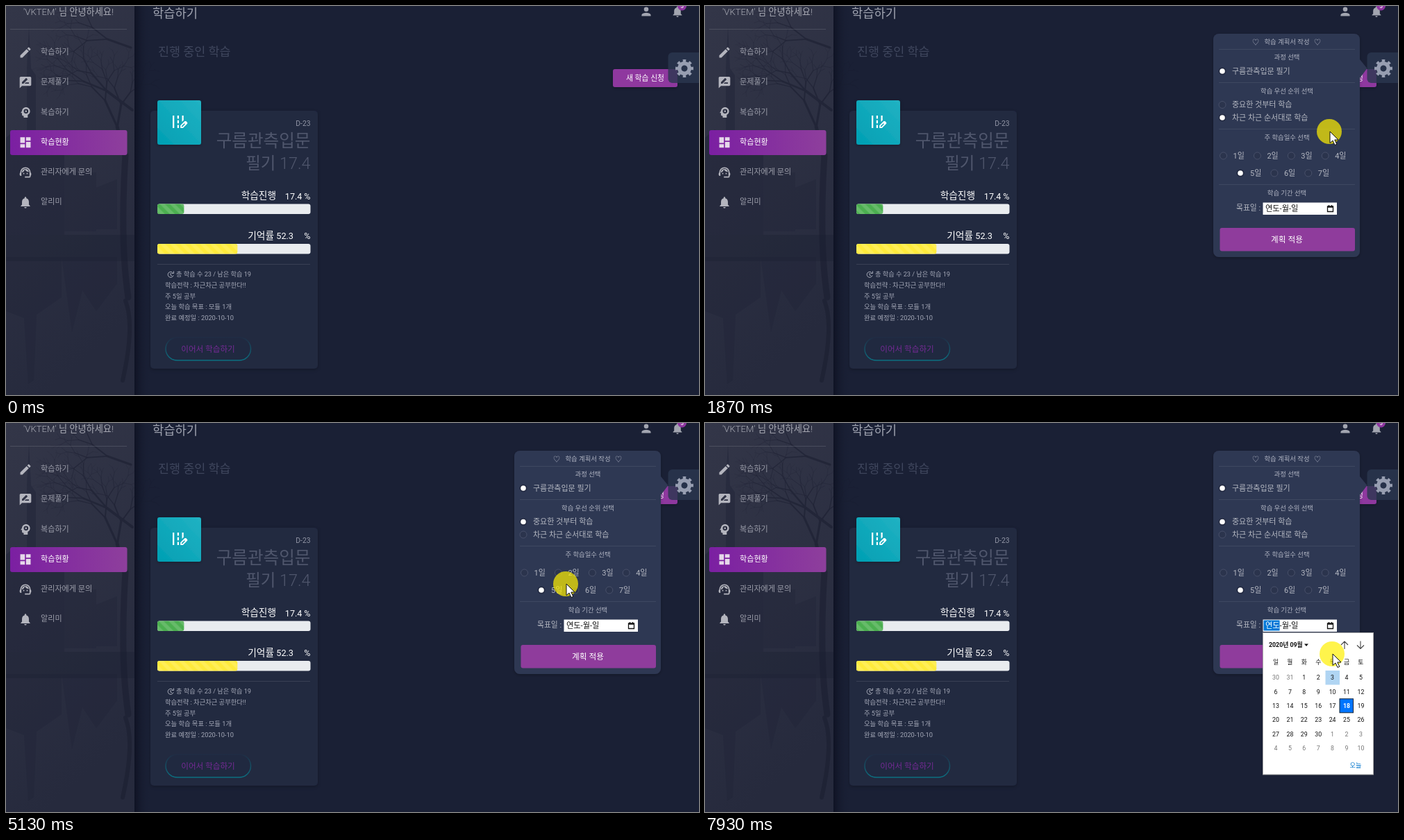
An HTML page for the animation above (8 s loop, 998x561 px).

```html
<!DOCTYPE html>
<html lang="ko">
<head>
<meta charset="utf-8">
<style>
html, body { margin: 0; width: 100%; height: 100%; overflow: hidden; background: #1a2035; }
svg { display: block; width: 998px; height: 561px; font-family: Roboto, "Noto Sans CJK KR", "Noto Sans KR", sans-serif; }
text { white-space: pre; }
</style>
</head>
<body>
<svg id="stage" viewBox="0 0 998 561"></svg>
<script>
const LOOP = 8000;
const stage = document.getElementById('stage');

// ---------- drawing helpers ----------
const label = (x, y, size, str, fill = '#a3a7b6', anchor = 'start', weight = 400) =>
  `<text x="${x}" y="${y}" dy=".37em" font-size="${size}" fill="${fill}" text-anchor="${anchor}" font-weight="${weight}">${str}</text>`;
const box = (x, y, w, h, fill, r = 0, extra = '') =>
  `<rect x="${x}" y="${y}" width="${w}" height="${h}" rx="${r}" fill="${fill}" ${extra}/>`;
const rule = (x1, x2, y, opacity = .08) =>
  `<path d="M${x1} ${y}H${x2}" stroke="#fff" stroke-opacity="${opacity}"/>`;
const icon = (cx, cy, scale, d, fill = '#b4b5be') =>
  `<path transform="translate(${cx - 12 * scale} ${cy - 12 * scale}) scale(${scale})" d="${d}" fill="${fill}" fill-rule="evenodd"/>`;
const radio = (x, y, on) => on
  ? `<circle cx="${x}" cy="${y}" r="5.5" fill="#232a41"/><circle cx="${x}" cy="${y}" r="3.8" fill="#fff"/>`
  : `<circle cx="${x}" cy="${y}" r="5" fill="#2b344d" stroke="#48506a"/>`;
const gradient = (id, from, to, coords) =>
  `<linearGradient id="${id}" ${coords}><stop stop-color="${from}"/><stop offset="1" stop-color="${to}"/></linearGradient>`;

const icons = {
  edit: 'M3 17.25V21h3.75L17.81 9.94l-3.75-3.75zM20.71 7.04c.39-.39.39-1.02 0-1.41l-2.34-2.34c-.39-.39-1.02-.39-1.41 0l-1.83 1.83 3.75 3.75z',
  review: 'M20 2H4c-1.1 0-2 .9-2 2v18l4-4h14c1.1 0 2-.9 2-2V4c0-1.1-.9-2-2-2zM6 14v-2.5l6.9-6.9c.2-.2.5-.2.7 0l1.8 1.8c.2.2.2.5 0 .7L8.5 14zm12 0h-7.5l2-2H18z',
  mind: 'M13 3C9.25 3 6.2 5.94 6 9.6L4.1 12.2c-.25.33 0 .8.4.8H6v3c0 1.1.9 2 2 2h1v3h7v-4.7c2.4-1.1 4-3.5 4-6.3 0-3.9-3.1-7-7-7zM13 6a4 4 0 110 8 4 4 0 010-8zm0 2.5a1.5 1.5 0 100 3 1.5 1.5 0 000-3z',
  board: 'M3 13h8V3H3zm0 8h8v-6H3zm10 0h8V11h-8zm0-18v6h8V3z',
  agent: 'M21 12.2C21 6.7 16.7 3 12 3c-4.7 0-9 3.6-9 9.3-.6.3-1 1-1 1.7v2c0 1.1.9 2 2 2h1v-6.1a7 7 0 0114 0V19h-8v2h8c1.1 0 2-.9 2-2v-1.2c.6-.3 1-.9 1-1.6v-2.3c0-.7-.4-1.4-1-1.7zM8 13h2v2H8zm6 0h2v2h-2zM18 11C17.5 8.2 15 6 12 6c-3 0-6.3 2.5-6 6.4 2.5-1 4.3-3.2 4.9-5.8C12.2 9.2 14.9 11 18 11z',
  bell: 'M12 22c1.1 0 2-.9 2-2h-4c0 1.1.9 2 2 2zm6-6v-5c0-3.1-1.6-5.6-4.5-6.3V4a1.5 1.5 0 00-3 0v.7C7.6 5.4 6 7.9 6 11v5l-2 2v1h16v-1z',
  person: 'M12 12a4 4 0 100-8 4 4 0 000 8zm0 2c-2.7 0-8 1.3-8 4v2h16v-2c0-2.7-5.3-4-8-4z',
  road: 'M18 4h-2v7.9l2-2zM4 4h2v16H4zM10 4h2v4h-2zM10 10h2v4h-2zM10 16h2v4h-2zM22.56 12.59l-1.15-1.15c-.59-.59-1.54-.59-2.12 0L14 16.73V20h3.27l5.29-5.29c.59-.59.59-1.54 0-2.12zM16.58 18.45h-1.03v-1.03L19 13.97 20.03 15z'
};

// ---------- sidebar ----------
let seed = 7;
const random = () => (seed = seed * 16807 % 2147483647) / 2147483647;
function branch(x, y, angle, length, width) {
  if (length < 6) return '';
  const x2 = x + Math.cos(angle) * length, y2 = y + Math.sin(angle) * length;
  let out = `<path d="M${x.toFixed(1)} ${y.toFixed(1)}L${x2.toFixed(1)} ${y2.toFixed(1)}" stroke-width="${width.toFixed(1)}"/>`;
  for (const side of [-1, 1])
    out += branch(x2, y2, angle + side * (.2 + random() * .5), length * (.62 + random() * .2), width * .62);
  return out;
}

const scenery = `
  ${box(0, 0, 185, 561, 'url(#sky)')}
  <g fill="#202438" opacity=".5">
    <path d="M0 190L14 178L30 186L30 90L33 30L36 90L43 100V190L62 202L84 200V330H0z"/>
    <path d="M84 240H130V325H84zM130 262L160 250V322H130z" opacity=".6"/>
    <path d="M0 362H80V420L44 445L40 540L32 545L26 450L0 440z" opacity=".7"/>
    <path d="M80 362H160V400L130 440L110 410L95 470z" opacity=".6"/>
  </g>
  ${box(0, 330, 185, 38, '#1c2033', 0, 'opacity=".35"')}
  <g stroke="#1b1e30" opacity=".55" stroke-linecap="round" fill="none">
    <path d="M176 420Q164 340 172 215" stroke-width="9"/>
    <path d="M172 425Q186 460 168 540" stroke-width="6"/>
    ${branch(172, 225, -1.8, 52, 5)}${branch(182, 150, -2.5, 46, 4)}${branch(180, 60, -2.8, 36, 3)}
  </g>`;

const menu = [['edit', '학습하기'], ['review', '문제풀기'], ['mind', '복습하기'], ['board', '학습현황'],
  ['agent', '관리자에게 문의'], ['bell', '알리미']];
const sidebar = scenery +
  label(90, 8, 13.2, "'VKTEM' 님 안녕하세요!", '#a9abb5', 'middle', 300) + rule(6, 174, 33.5, .13) +
  box(6, 179, 168.5, 36, 'url(#active)', 3) +
  menu.map(([name, title], i) => {
    const y = 67 + i * 43.25, on = i === 3;
    return icon(28, y, .83, icons[name], on ? '#e6d8ea' : '#b4b5be') +
      label(50, y - 1, 11.1, title, on ? '#fff' : '#9c9eaa', 'start', on ? 500 : 300);
  }).join('') +
  box(185, 0, 22, 561, 'url(#edge)');

// ---------- page and course card ----------
const meter = (y, percent, color) => `<g transform="translate(218 ${y})">
  ${box(0, 0, 220.5, 14.4, '#e9ecef', 3)}
  ${box(0, 0, 220.5 * percent / 100, 14.4, color, 3)}
  ${box(0, 0, 220.5 * percent / 100, 14.4, 'url(#stripes)', 3)}</g>`;

const page =
  label(211, 10, 17.7, '학습하기', '#a0a4b1', 'start', 300) +
  label(219, 66, 17.4, '진행 중인 학습', '#3f465d', 'start', 300) +
  icon(922, 8, .82, icons.person, '#a2a5b0') + icon(967, 8, .8, icons.bell, '#a2a5b0') +
  `<circle cx="973.5" cy="0" r="6.5" fill="#8e36a0"/>` + label(973.5, 0, 8, '5', '#fff', 'middle', 500) +
  box(874, 91, 93, 26, '#8f389f', 3, 'filter="url(#soft)"') +
  label(920.5, 104, 10.8, '새 학습 신청', '#fff', 'middle', 500);

const card = box(208, 151, 241, 372, '#202940', 5, 'filter="url(#soft)"') +
  box(218, 136, 63, 64, 'url(#cyan)', 3, 'filter="url(#soft)"') +
  icon(249, 167, 1.12, icons.road, '#fff') +
  label(438.5, 169, 10.3, 'D-23', '#9296a5', 'end') +
  label(438.5, 194, 24.6, '구름관측입문', '#50576d', 'end', 100) +
  label(438.5, 226, 23.4, '필기 <tspan font-weight="300">17.4</tspan>', '#50576d', 'end', 100) +
  label(389, 273, 13.7, '학습진행', '#fff', 'end', 500) + label(438.5, 274, 12.5, '17.4 %', '#fff', 'end') +
  label(386, 331, 13.7, '기억률', '#fff', 'end', 500) + label(414, 331, 12.7, '52.3', '#fff', 'end') +
  label(438.5, 331, 12.5, '%', '#fff', 'end') +
  meter(285.6, 17.4, '#4caf50') + meter(343, 52.3, '#ffeb3b') + rule(218, 438, 372.5, .1) +
  `<path d="M240 384.5a4 4 0 101 4M241.5 382.5v3h-3M237 385v3l2 1" fill="none" stroke="#a9adba"/>` +
  label(245, 387, 9.2, '총 학습 수 23 / 남은 학습 19') +
  ['학습전략 : 차근차근 공부한다!!', '주 5일 공부', '오늘 학습 목표 : 모듈 1개', '완료 예정일 : 2020-10-10']
    .map((line, i) => label(229, 403 + i * 15.5, 9.3, line)).join('') +
  box(230, 478, 122.5, 33, '#202940', 16.5, 'stroke="url(#rim)" stroke-width="1.5"') +
  label(291, 494.5, 11.6, '이어서 학습하기', '#752a95', 'middle', 300);

// Eight teeth: a dashed ring split into sixteen equal arcs, one tooth pointing straight up.
const gear = box(953.5, 67, 60, 44, '#2b374f', 6, 'opacity=".8"') +
  `<g fill="none" stroke="#979eb1" transform="rotate(-11.25 977 90)">
    <circle cx="977" cy="90" r="7.3" stroke-width="5.6"/>
    <circle cx="977" cy="90" r="11" stroke-width="4" pathLength="16" stroke-dasharray="1"/></g>`;

// ---------- plan panel ----------
const heading = (y, str) => label(838, y, 9.4, str, '#b0b4c2', 'middle');
const option = (x, y, str, on = false) => radio(x, y, on) + label(x + 14, y - .5, 11, str, '#b5b8c2');
const days = [0, 1, 2, 3, 4, 5, 6].map(i => {
  const second = i > 3;
  return option((second ? 771 : 746.5) + (second ? i - 4 : i) * 48.9, second ? 241 : 216, `${i + 1}일`, i === 4);
}).join('');

const panel = box(732, 40, 211, 322, '#2f3853', 8, 'filter="url(#soft)"') +
  `<path d="M943 77L953.5 90L943 104z" fill="#2f3853"/>` +
  heading(52, '학습 계획서 작성') + label(793, 52, 10, '♡', '#b0b4c2', 'middle') + label(882, 52, 10, '♡', '#b0b4c2', 'middle') +
  [62, 110, 177, 257].map(y => rule(740, 936, y + .5)).join('') +
  heading(74, '과정 선택') + option(745, 94, '구름관측입문 필기', true) +
  heading(123, '학습 우선 순위 선택') + option(745, 142.5, '중요한 것부터 학습') + option(745, 161, '차근 차근 순서대로 학습') +
  `<g id="orderLast">${radio(745, 161, true)}</g><g id="orderFirst">${radio(745, 142.5, true)}</g>` +
  heading(190, '주 학습일수 선택') + days + heading(270, '학습 기간 선택') +
  label(765, 291, 10.8, '목표일 :', '#b5b8c2') + box(803.5, 283.5, 106.5, 17.5, '#fff') +
  label(807, 292, 11.2, '연도-월-일', '#111') +
  `<path d="M896.5 289v7.5h8v-7.5zM896.5 290h8M898.5 287v2M902.5 287v2" fill="none" stroke="#111" stroke-width="1.3"/>` +
  box(741.5, 320, 194.5, 33.5, '#8f3c9c', 3) + label(838, 337, 11.7, '계획 적용', '#fff', 'middle', 500);

// ---------- date picker ----------
const STEP = 20.4;
const cells = Array.from({ length: 42 }, (_, i) => {
  const day = i < 2 ? 30 + i : (i - 2) % 30 + 1, outside = i < 2 || i > 31, chosen = i === 19;
  const x = 822 + i % 7 * STEP, y = 367 + Math.floor(i / 7) * STEP;
  return (chosen ? box(x - 10, y - 10, 19.5, 20, '#0075ff', 0, 'stroke="#123"') : '') +
    label(x, y, 8.8, day, chosen ? '#fff' : outside ? '#767676' : '#111', 'middle', chosen ? 700 : 400);
}).join('');

const picker = box(804.5, 284.5, 23, 15, '#0078d7') + label(807, 292, 11.2, '연도', '#fff') +
  box(803.5, 302.5, 159, 204.5, '#fff', 0, 'stroke="#a9a9a9"') +
  box(893.5, 357, 20.5, 20.5, '#b0d5f3', 0, 'id="hover"') +
  label(812, 320, 8.8, '2020년 09월', '#111', 'start', 700) +
  `<path d="M863 318.5h6l-3 3.5z" fill="#111"/>
   <path d="M921 326v-11M916 320l5-5 5 5M944 314.5v11M939 320.5l5 5 5-5" fill="none" stroke="#444" stroke-width="1.1"/>` +
  [...'일월화수목금토'].map((d, i) => label(822 + i * STEP, 345, 8.8, d, '#111', 'middle')).join('') +
  cells + label(937, 494, 9.2, '오늘', '#0074cc', 'middle');

// ---------- pointer ----------
const pointer = `<circle r="18" fill="#fff000" fill-opacity=".7"/>
  <g fill="#fff" stroke="#111" stroke-linejoin="round">
    <path id="arrow" d="M1 0V16.5l4-3.5 3 6.5 2.8-1.2-3-6.3h5.200z"/>
    <path id="hand" d="M-1.5 1.5q2-3 4 0v7q2.500-1.500 4 .7q2.500-1 3.500 1q2.500-.5 2.500 2v4q0 2-2 5.500h-8.500l-6-8q0-2.700 2.500-1.700z"/>
  </g>`;

stage.innerHTML = `<defs>
  ${gradient('sky', '#333648', '#262a3d', 'x1="0" y1="0" x2=".3" y2="1"')}
  ${gradient('active', '#7b1fa2', '#8e3f9c', '')}
  ${gradient('edge', '#0f1324', '#1a203500', '')}
  ${gradient('cyan', '#009fb3', '#22b2c3', 'x1="0" y1="1" x2="1" y2="0"')}
  ${gradient('rim', '#202c44', '#0b6f80', 'x1="0" y1="0" x2="0" y2="1"')}
  <filter id="soft" x="-20%" y="-20%" width="140%" height="150%"><feDropShadow dx="0" dy="1.5" stdDeviation="2" flood-opacity=".25"/></filter>
  <pattern id="stripes" width="14.4" height="14.4" patternUnits="userSpaceOnUse">
    <path d="M0 7.2V14.4H7.2zM0 0H7.2L14.4 7.2V14.4z" fill="#fff" fill-opacity=".15"/>
  </pattern></defs>
  ${box(0, 0, 998, 561, '#1a2035')}${sidebar}${page}${card}${gear}
  <g id="panel">${panel}</g><g id="picker">${picker}</g><g id="pointer">${pointer}</g>`;

// ---------- timeline ----------
// pointer path: time, x, y
const path = [[70, 890, 372], [250, 890, 372], [800, 972, 88], [950, 976, 89], [1100, 972, 89], [1740, 972, 88],
  [1870, 899, 181], [2250, 905, 190], [2600, 919, 182], [2860, 752, 95], [2930, 753, 101], [3150, 753, 101],
  [3470, 757, 136], [3700, 757, 140], [4400, 752, 141], [4600, 752, 141], [5000, 809, 233], [5130, 806, 232],
  [6250, 807, 232], [6650, 901, 294], [7800, 902, 294], [7930, 903, 333], [8000, 903, 333]];
const clamp = v => Math.max(0, Math.min(1, v));

function pointerAt(t) {
  const i = Math.max(1, path.findIndex(key => key[0] > t));
  const [t0, x0, y0] = path[i - 1], [t1, x1, y1] = path[i];
  const p = clamp((t - t0) / (t1 - t0)), e = p * p * (3 - 2 * p);
  return [x0 + (x1 - x0) * e, y0 + (y1 - y0) * e];
}

const part = id => document.getElementById(id);
const show = (id, visible) => part(id).setAttribute('visibility', visible ? 'inherit' : 'hidden');

function draw(now) {
  const t = now % LOOP;
  part('stripes').setAttribute('x', 14.4 * (1.25 - t / 1000 % 1));

  const open = clamp((t - 1065) / 167);
  show('panel', open > 0);
  part('panel').setAttribute('opacity', open);
  part('panel').setAttribute('transform', `translate(943 40) scale(${open}) translate(-943 -40)`);
  show('orderLast', open > 0 && t < 3800);
  show('orderFirst', t >= 3800);

  show('picker', t >= 7130);
  show('hover', t >= 7870);

  const pointing = t > 700 && t < 1780 || t > 2780 && t < 4680;
  show('pointer', t >= 70);
  show('hand', t >= 70 && pointing);
  show('arrow', t >= 70 && !pointing);
  part('pointer').setAttribute('transform', `translate(${pointerAt(t)})`);
  requestAnimationFrame(draw);
}
const start = performance.now();
requestAnimationFrame(now => draw(Math.max(0, now - start)));
</script>
</body>
</html>
```
